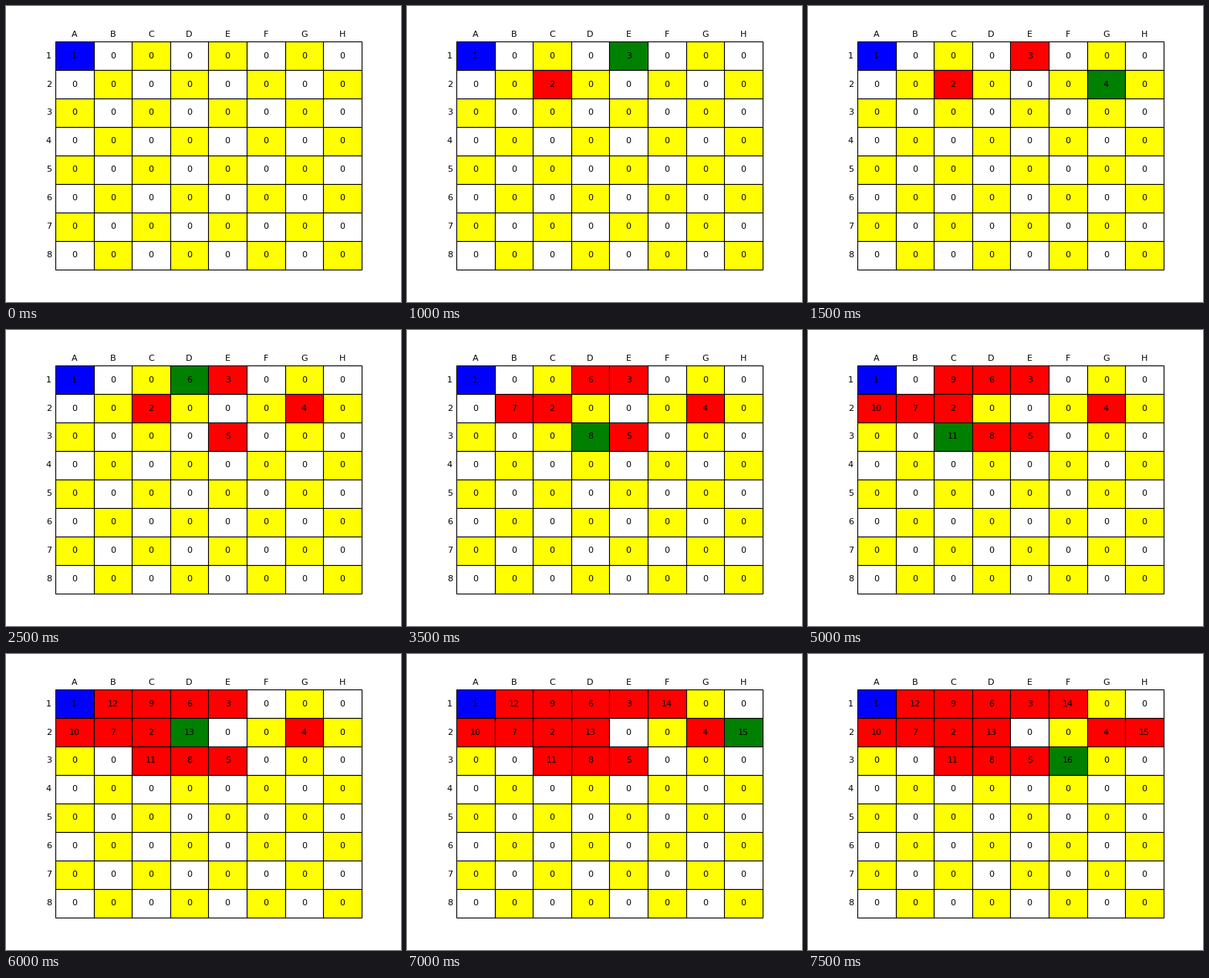
A matplotlib script for the animation above (8 s loop, 512 by 384 pixels).

```python
import matplotlib.pyplot as plt
from matplotlib.animation import FuncAnimation
from matplotlib.table import Table

SIZE = 8
COLS = "ABCDEFGH"
TOUR = "A1 C2 E1 G2 E3 D1 B2 D3 C1 A2 C3 B1 D2 F1 H2 F3".split()
PATH = [(int(sq[1]) - 1, COLS.index(sq[0])) for sq in TOUR]

plt.rcParams["font.family"] = "DejaVu Sans"
fig, ax = plt.subplots(figsize=(6.4, 4.8), dpi=80, facecolor="white")
ax.set_axis_off()

board = Table(ax, bbox=[0, 0, 1, 1])
step = 1 / SIZE
for row in range(SIZE):
    for col in range(SIZE):
        board.add_cell(row, col, step, step, text="0", loc="center")

# Borderless row and column headings outside the grid
for i in range(SIZE):
    board.add_cell(i, -1, step, step, text=str(i + 1), loc="right",
                   edgecolor="none", facecolor="none")
    board.add_cell(-1, i, step, step / 2, text=COLS[i], loc="center",
                   edgecolor="none", facecolor="none")
ax.add_table(board)


def paint(pos, number, color):
    cell = board[pos]
    cell.get_text().set_text(str(number))
    cell.set_facecolor(color)


def update(move):
    for row in range(SIZE):
        for col in range(SIZE):
            paint((row, col), 0, "white" if (row + col) % 2 else "yellow")
    for n, pos in enumerate(PATH[:move + 1]):
        color = "blue" if n == 0 else "green" if n == move else "red"
        paint(pos, n + 1, color)
    return [board]


anim = FuncAnimation(fig, update, frames=len(PATH), interval=500,
                     repeat=True, repeat_delay=0, blit=False)
plt.show()
```
